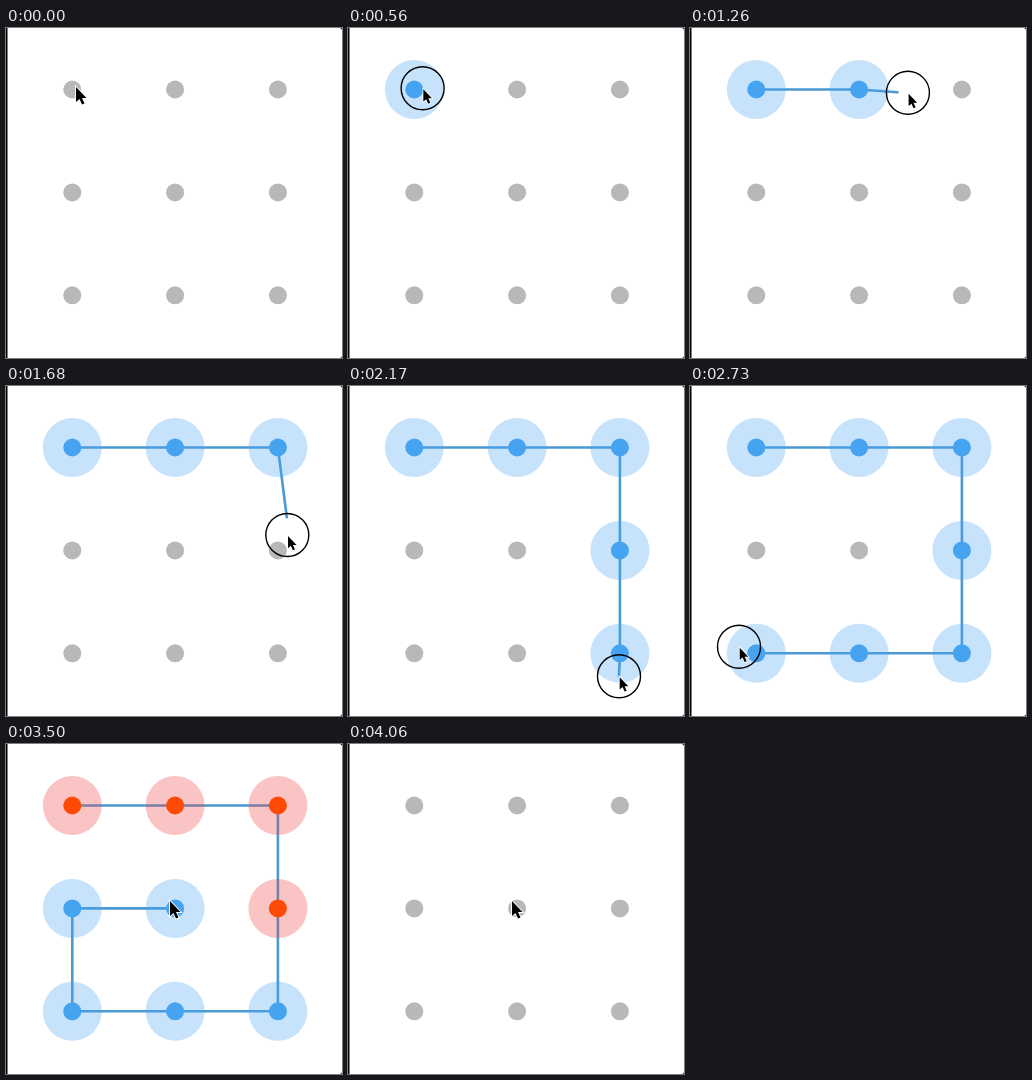
Animation of 336x330 px, one loop 4200 ms. Source, as an HTML page with a canvas:

```html
<!DOCTYPE html>
<html lang="en">
<head>
<meta charset="utf-8">
<title>Pattern lock</title>
<style>
  html, body { margin: 0; width: 100%; height: 100%; overflow: hidden; background: #fff; }
  canvas { display: block; }
</style>
</head>
<body>
<canvas id="stage" width="336" height="330"></canvas>
<script>
const ctx = document.getElementById('stage').getContext('2d');
const LOOP = 4200, STEP = 70;
const PRESS = 490, RELEASE = 3290, ERROR = 3440, RESET = 3920;
const LAG = 30, HIT = 29;

const nodes = Array.from({ length: 9 }, (_, i) => ({
  x: 66.3 + (i % 3) * 102.8,
  y: 61.5 + Math.floor(i / 3) * 102.9
}));

const linear = k => k;
const smooth = k => k * k * (3 - 2 * k);
const easeOut = k => k * (2 - k);

// Pointer stops, each with the easing of the way to it
const stops = [
  { t: 0, x: 70, y: 59 },
  { t: PRESS, x: 70, y: 60, ease: linear },
  { t: 910, x: 132.5, y: 61.3, ease: smooth },
  { t: 1540, x: 279, y: 67, ease: smooth },
  { t: 1680, x: 281.3, y: 148.8, ease: linear },
  { t: 2170, x: 271, y: 290, ease: easeOut },
  { t: 2730, x: 49, y: 260.5, ease: linear },
  { t: 2800, x: 44, y: 250, ease: linear },
  { t: 2940, x: 52, y: 185, ease: linear },
  { t: 3220, x: 164, y: 157, ease: easeOut }
];

function pointer(t) {
  const i = stops.findIndex(s => s.t > t);
  if (i < 0) return stops[stops.length - 1];
  const a = stops[i - 1], b = stops[i];
  const k = b.ease((t - a.t) / (b.t - a.t));
  return { x: a.x + (b.x - a.x) * k, y: a.y + (b.y - a.y) * k };
}

// Nodes in the order the trailing line end reaches them
const chain = [];
for (let t = PRESS; t < RELEASE; t += 5) {
  const p = pointer(t - LAG);
  const node = nodes.find(n => Math.hypot(n.x - p.x, n.y - p.y) < HIT);
  if (node && !chain.some(c => c.node === node)) chain.push({ node, t });
}

function disc(p, r, color) {
  ctx.beginPath();
  ctx.arc(p.x, p.y, r, 0, Math.PI * 2);
  ctx.fillStyle = color;
  ctx.fill();
}

function drawFrame() {
  ctx.fillStyle = '#000';
  ctx.fillRect(0, 0, 336, 330);
  ctx.beginPath();
  ctx.roundRect(1.5, 0, 334.5, 330, [0, 2.5, 2.5, 0]);
  ctx.fillStyle = '#fff';
  ctx.fill();
}

function drawLine(points) {
  ctx.beginPath();
  points.forEach(p => ctx.lineTo(p.x, p.y));
  ctx.strokeStyle = '#4b99d3';
  ctx.lineWidth = 2.6;
  ctx.lineCap = ctx.lineJoin = 'round';
  ctx.stroke();
}

function drawRing(p) {
  ctx.beginPath();
  ctx.arc(p.x, p.y + 0.2, 21.5, 0, Math.PI * 2);
  ctx.strokeStyle = '#000';
  ctx.lineWidth = 1.4;
  ctx.stroke();
}

const arrow = new Path2D('M0 0V15L3.5 12L6 17.5L8.5 16.5L6 11H10.5Z');

// The arrow shrinks a little while the button is down
function drawCursor(p, held) {
  ctx.save();
  ctx.translate(p.x, p.y);
  if (held) {
    ctx.translate(0.7, 1.2);
    ctx.scale(0.82, 0.82);
  }
  ctx.lineJoin = 'miter';
  ctx.lineWidth = 1.8;
  ctx.strokeStyle = '#fff';
  ctx.stroke(arrow);
  ctx.fillStyle = '#000';
  ctx.fill(arrow);
  ctx.restore();
}

function draw(t) {
  const p = pointer(t);
  const held = t >= PRESS && t < RELEASE;
  const lit = t < RESET ? chain.filter(c => c.t <= t) : [];

  drawFrame();
  if (lit.length) {
    const points = lit.map(c => c.node);
    if (held) points.push(pointer(t - LAG));
    drawLine(points);
  }
  nodes.forEach(n => {
    const i = lit.findIndex(c => c.node === n);
    if (i < 0) return disc(n, 9, '#b8b8b8');
    const wrong = t >= ERROR + i * 16;
    disc(n, 29.5, wrong ? 'rgba(237,60,60,.3)' : 'rgba(70,164,240,.3)');
    disc(n, 9, wrong ? '#ff4a05' : '#46a3f0');
  });

  if (held) drawRing(p);
  drawCursor(p, held);
}

function tick() {
  const t = performance.now() % LOOP;
  draw(Math.floor(t / STEP) * STEP);
  requestAnimationFrame(tick);
}
tick();
</script>
</body>
</html>
```
